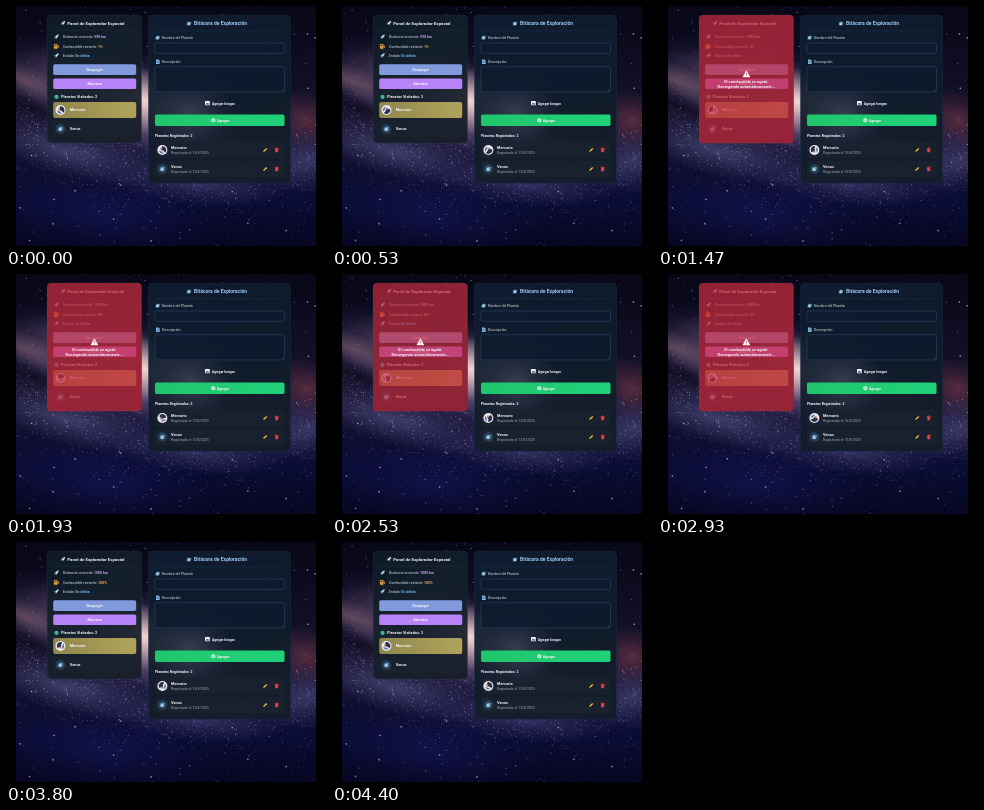
Animation of 320x240 px, one loop 4470 ms. Source, as an HTML page with a canvas:

```html
<!DOCTYPE html>
<html lang="es">
<head>
<meta charset="utf-8">
<style>
html, body { margin: 0; width: 100%; height: 100%; overflow: hidden; background: #000; }
canvas, svg { position: absolute; left: 0; top: 0; width: 320px; height: 240px; }
svg { font-family: Roboto, sans-serif; font-size: 3.5px; fill: #dbe3ec; }
.b { font-weight: 700; fill: #f4f6f8; }
.mid { text-anchor: middle; }
.dim { fill: #9da7b5; }
.field { fill: #0d1b2e; fill-opacity: .8; stroke: #2c4c72; stroke-width: .5; }
.row { fill: #1a222f; fill-opacity: .85; }
</style>
</head>
<body>
<canvas id="sky" width="320" height="240"></canvas>
<svg viewBox="0 0 320 240">
  <defs>
    <linearGradient id="glass" x2=".5" y2="1">
      <stop stop-color="#0f1a28"/><stop offset=".5" stop-color="#13202b"/><stop offset="1" stop-color="#171d28"/>
    </linearGradient>
    <linearGradient id="glassBlue" x2=".3" y2="1">
      <stop stop-color="#101d31"/><stop offset=".55" stop-color="#0e1c2b"/><stop offset="1" stop-color="#131c28"/>
    </linearGradient>
    <radialGradient id="glow">
      <stop stop-color="#8a8296" stop-opacity=".3"/><stop offset="1" stop-color="#5a5575" stop-opacity="0"/>
    </radialGradient>
    <linearGradient id="green"><stop stop-color="#20c56c"/><stop offset="1" stop-color="#20d27a"/></linearGradient>
    <linearGradient id="gold"><stop stop-color="#8f874c"/><stop offset="1" stop-color="#b0a45b"/></linearGradient>
    <g id="rocket">
      <path d="M2.4-2.4C.6-2.4-.8-1-1.2.4L-.3 1.3C1.1.8 2.4-.6 2.4-2.4Z" fill="#dce5f2"/>
      <path d="M-.8-.8-2.3-.3-1.3.4ZM.8.8.3 2.3-.4 1.3Z" fill="#5b8de0"/>
      <path d="M-1.2.8-2.2 2.2-.8 1.2Z" fill="#f18b45"/>
      <circle cx=".9" cy="-.9" r=".5" fill="#447bc5"/>
    </g>
    <g id="orb">
      <circle r="2.1" fill="#4a7da6"/>
      <path d="M-1.6-.7Q0-1.6 1.2-1.2L.2.1 1.5 1Q-.5 2-1.3.8Z" fill="#a9cfe3"/>
      <path d="M-2.4 1.4Q.6 1.4 2.3-1.5" fill="none" stroke="#d0e4f2" stroke-width=".4"/>
    </g>
    <g id="venus"><circle r="5" fill="#263c51"/><use href="#orb" transform="scale(1.15)"/></g>
    <g id="mercury">
      <circle r="5" fill="#e9eaf0"/>
      <g class="spin">
        <path d="M-.5-3.8A3.9 3.9 0 0 1 2.8 2.8Q1 0-1.2.4Z" fill="#29304a"/>
        <path d="M-3.6.6Q-1 .6 1.5 3.4A3.9 3.9 0 0 1-3.6.6Z" fill="#6472b4"/>
        <circle cx="-1.3" cy="-.9" r="1.1" fill="#d07f52"/>
      </g>
    </g>
    <g id="tools">
      <path d="M-2 2-1.6.6 1.1-2.1 2.1-1.1-.6 1.6Z" fill="#f5b33c"/>
      <path d="M9.8-1.2H13.2L12.8 2.3H10.2ZM9.4-2H10.7L11-2.5H12L12.3-2H13.6V-1.5H9.4Z" fill="#e93e43"/>
    </g>
  </defs>

  <g id="panel">
    <rect x="41.2" y="9.2" width="94.2" height="127.8" rx="4" fill="url(#glass)" fill-opacity=".93" stroke="#2a3945" stroke-width=".4"/>
    <use href="#rocket" x="56.8" y="17.3"/>
    <text class="b" x="61.3" y="18.8" font-size="4.4">Panel de Explorador Espacial</text>
    <path d="M47 24.2H130" stroke="#354655" stroke-width=".3"/>
    <use href="#rocket" x="50.3" y="31"/>
    <text x="57" y="32.3">Distancia recorrida: <tspan class="b" id="km" style="fill:#c9a5f7"></tspan></text>
    <path d="M48.2 38.3H51.2V42.6H48.2ZM51.2 39.2 52.6 40V42" fill="#eca336" stroke="#eca336" stroke-width=".5"/>
    <path d="M48.7 38.9H50.7V40H48.7Z" fill="#273443"/>
    <text x="57" y="41.8">Combustible restante: <tspan class="b" id="fuel" style="fill:#f8ad4d"></tspan></text>
    <use href="#rocket" x="50.3" y="49.7"/>
    <text x="57" y="51.1">Estado: <tspan class="b" style="fill:#77bfff">En órbita</tspan></text>
    <rect x="47.2" y="58.3" width="83" height="10.6" rx="1.7" fill="#8199dd"/>
    <text class="b mid" x="88.7" y="64.9" font-size="3.8">Despegar</text>
    <rect x="47.2" y="72.5" width="83" height="10.6" rx="1.7" fill="#b783f7"/>
    <text class="b mid" x="88.7" y="79.1" font-size="3.8">Aterrizar</text>
    <circle cx="50.6" cy="91" r="2.2" fill="#259a79"/>
    <path d="M48.6 90.3 51 89.5 50 91.3 52 92" fill="none" stroke="#65d8c2" stroke-width=".7"/>
    <text class="b" x="55" y="92.4" font-size="3.8">Planetas Visitados: 2</text>
    <rect x="47.2" y="96" width="83" height="16" rx="2" fill="url(#gold)"/>
    <use href="#mercury" x="54.5" y="104"/>
    <text class="b" x="63.7" y="105.4" font-size="3.9">Mercurio</text>
    <rect class="row" x="47.2" y="115" width="83" height="16" rx="2"/>
    <use href="#venus" x="54.5" y="123"/>
    <text class="b" x="63.7" y="124.4" font-size="3.9">Venus</text>
  </g>

  <g id="alarm">
    <rect id="red" x="41" y="9" width="94.6" height="128.2" rx="4" fill="#c7263c"/>
    <path d="M88.4 64.8 91.9 71H84.9Z" fill="#fff" stroke="#fff" stroke-width=".5" stroke-linejoin="round"/>
    <path d="M88.4 66.7V68.9M88.4 69.6V70.3" stroke="#b72a42" stroke-width=".7"/>
    <g class="b mid" font-size="4">
      <text x="88.4" y="77.2">El combustible se agotó.</text>
      <text x="88.4" y="81.8">Recargando automáticamente...</text>
    </g>
  </g>

  <rect x="142.5" y="9.2" width="142" height="168" rx="4" fill="url(#glassBlue)" fill-opacity=".93" stroke="#1d3049" stroke-width=".4"/>
  <ellipse cx="185" cy="108" rx="42" ry="40" fill="url(#glow)"/>
  <use href="#orb" x="183" y="17.6"/>
  <text class="b" x="188" y="19.2" font-size="5" style="fill:#9dcaf5">Bitácora de Exploración</text>
  <path d="M149 24.8H278.5" stroke="#284362" stroke-width=".3"/>
  <use href="#orb" x="151.7" y="31.7"/>
  <text x="156" y="33">Nombre del Planeta</text>
  <rect class="field" x="149" y="37" width="129.5" height="10.3" rx="1.5"/>
  <path d="M150 53.5H152.4L153.7 54.8V58H150Z" fill="#81b5e4"/>
  <path d="M150.7 55.4H152.8M150.7 56.6H152.8" stroke="#263f5e" stroke-width=".4"/>
  <text x="156" y="57">Descripción</text>
  <rect class="field" x="149" y="60.7" width="129.5" height="25.2" rx="1.5"/>
  <path d="M276 85 277.6 83.4M277 85 277.6 84.4" stroke="#8da0b6" stroke-width=".25"/>
  <rect x="199" y="95" width="4.8" height="4.3" rx=".6" fill="#eef3f7"/>
  <path d="M199.6 98.5 201 96.8 202 97.8 202.6 97.2 203.3 98.5Z" fill="#283a4b"/>
  <text class="b" x="206" y="98.5" font-size="3.2">Agregar Imagen</text>
  <rect x="149" y="108.5" width="129.5" height="11.6" rx="1.8" fill="url(#green)"/>
  <circle cx="207.3" cy="114.3" r="2" fill="#effff5"/>
  <path d="M206.2 114.3H208.4M207.3 113.2V115.4" stroke="#22bd70" stroke-width=".55"/>
  <text class="b" x="211" y="115.5" font-size="3.3">Agregar</text>
  <text class="b" x="149" y="131">Planetas Registrados: 2</text>
  <rect class="row" x="149" y="136" width="129.5" height="16" rx="2"/>
  <use href="#mercury" x="156.4" y="144"/>
  <text class="b" x="165" y="143.3" font-size="3.9">Mercurio</text>
  <text class="dim" x="165" y="148">Registrado el 13/8/2025</text>
  <use href="#tools" x="259.2" y="144"/>
  <rect class="row" x="149" y="155" width="129.5" height="16" rx="2"/>
  <use href="#venus" x="156.4" y="163"/>
  <text class="b" x="165" y="162.3" font-size="3.9">Venus</text>
  <text class="dim" x="165" y="167">Registrado el 13/8/2025</text>
  <use href="#tools" x="259.2" y="163"/>
</svg>

<script>
const LOOP = 4470, ALARM_START = 700, ALARM_END = 3735;
const $ = id => document.getElementById(id);

let seed = 71;
const random = () => (seed = seed * 16807 % 2147483647) / 2147483647;
const spread = () => random() + random() + random() - 1.5;

function paintSky() {
  const c = $('sky').getContext('2d');
  c.beginPath();
  c.rect(10, 0, 300, 240);
  c.clip();
  const base = c.createLinearGradient(0, 0, 0, 240);
  base.addColorStop(0, '#070716');
  base.addColorStop(.45, '#15122c');
  base.addColorStop(.8, '#0b0c35');
  base.addColorStop(1, '#060622');
  c.fillStyle = base;
  c.fillRect(0, 0, 320, 240);

  const cloud = (x, y, rx, ry, angle, color, alpha) => {
    const g = c.createRadialGradient(0, 0, 0, 0, 0, 1);
    g.addColorStop(0, `rgba(${color},${alpha})`);
    g.addColorStop(.5, `rgba(${color},${alpha * .45})`);
    g.addColorStop(1, `rgba(${color},0)`);
    c.save();
    c.translate(x, y);
    c.rotate(angle);
    c.scale(rx, ry);
    c.fillStyle = g;
    c.fillRect(-1, -1, 2, 2);
    c.restore();
  };
  cloud(145, 110, 190, 62, .3, '80,66,125', .7);
  cloud(130, 98, 140, 42, .3, '165,125,145', .75);
  cloud(139, 95, 50, 32, .3, '255,225,220', .9);
  cloud(20, 75, 50, 16, .4, '150,110,125', .5);
  cloud(25, 102, 60, 10, .35, '12,10,24', .7);
  cloud(60, 145, 100, 25, .28, '92,88,140', .6);
  cloud(190, 178, 90, 22, .1, '80,76,130', .5);
  cloud(300, 115, 40, 30, .4, '130,60,75', .6);
  cloud(300, 155, 50, 30, -.2, '85,80,135', .55);
  cloud(100, 210, 110, 40, .1, '24,24,95', .5);

  const star = (x, y, size, hue, alpha) => {
    c.fillStyle = `hsla(${hue},45%,78%,${alpha})`;
    c.fillRect(x, y, size, size);
  };
  // Grainy outer arm of the galaxy, sagging below the panels.
  for (let i = 0; i < 3200; i++) {
    const x = 10 + random() * 300, u = x / 320;
    const y = 112 + 168 * u - 130 * u * u + spread() * 42;
    star(x, y, .5 + random() * .6, 215 + random() * 70, .08 + random() ** 4 * .6);
  }
  for (let i = 0; i < 1500; i++) {
    const light = random();
    const size = light > .97 ? 1.4 : .5 + random() * .6;
    star(10 + random() * 300, 240 * random(), size, 215 + random() * 70, .08 + light ** 5 * .8);
  }
}

function draw(now) {
  const t = now % LOOP;
  const alarm = t >= ALARM_START && t < ALARM_END;
  $('km').textContent = t < ALARM_START ? '990 km' : '1000 km';
  $('fuel').textContent = t < ALARM_START ? '1%' : alarm ? '0%' : '100%';
  $('alarm').style.display = alarm ? '' : 'none';
  const pulse = (1 - Math.cos((t - ALARM_START) / 1000 * 2 * Math.PI)) / 2;
  $('red').setAttribute('opacity', .61 + .26 * pulse);
  for (const disc of document.querySelectorAll('.spin'))
    disc.setAttribute('transform', `rotate(${t / LOOP * 720})`);
  requestAnimationFrame(draw);
}

paintSky();
draw(performance.now());
</script>
</body>
</html>
```
